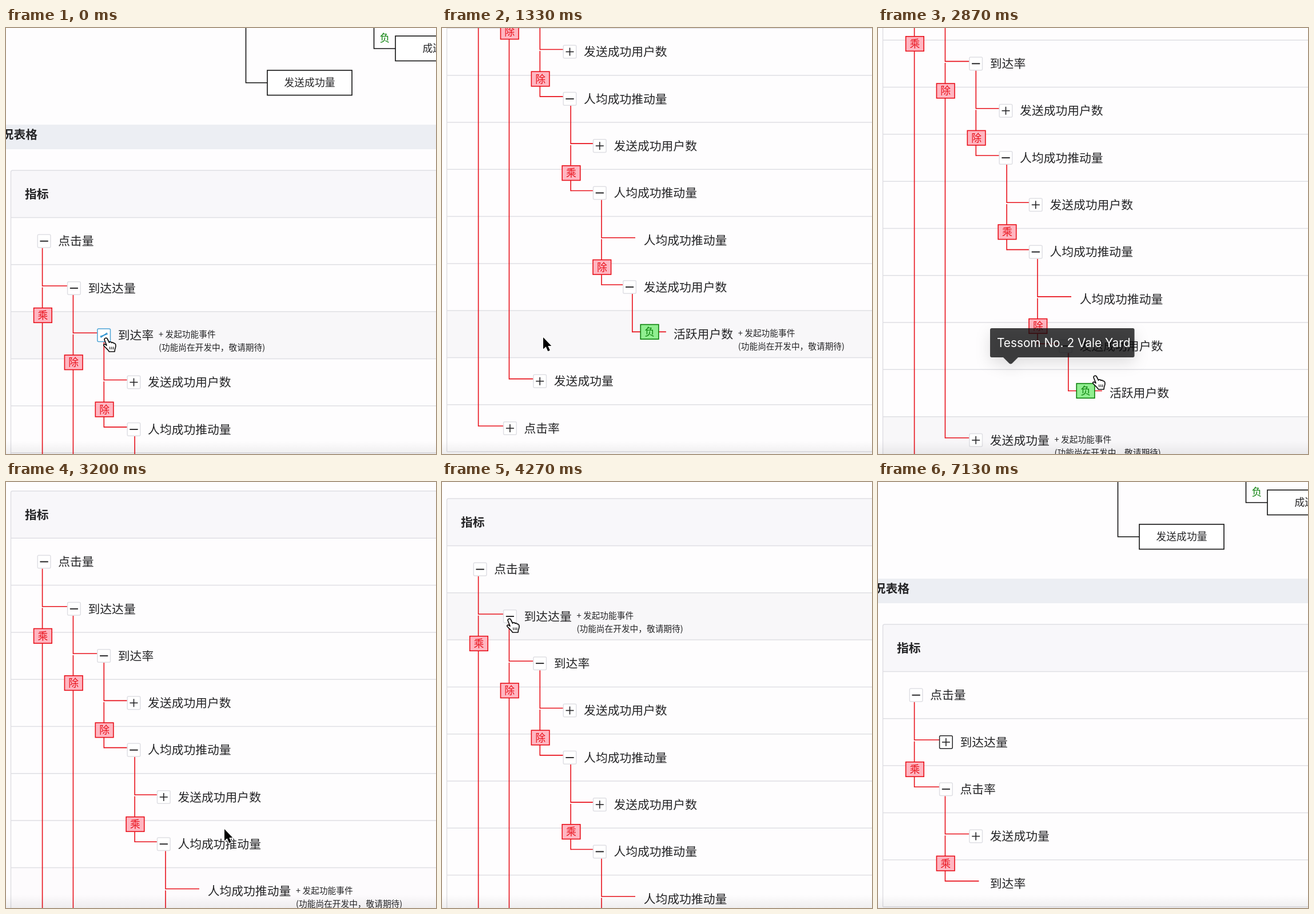
These frames come from a looping animation (752 px wide and 745 px high, 7.19 s). An HTML page:

```html
<!DOCTYPE html>
<html lang="zh-CN">
<head>
<meta charset="utf-8">
<style>
html, body { margin: 0; width: 100%; height: 100%; overflow: hidden; background: #fefdfe; }
svg { display: block; width: 100vw; height: 100vh; }
text { font-family: "Noto Sans CJK SC", "Noto Sans CJK", sans-serif; fill: #242426; white-space: pre; }
.tip { font-family: Inter, Roboto, sans-serif; fill: #fff; }
</style>
</head>
<body>
<svg viewBox="0 0 752 745">
  <defs>
    <linearGradient id="fade" x2="0" y2="1">
      <stop offset="0" stop-opacity="0"/><stop offset="1" stop-opacity=".06"/>
    </linearGradient>
    <filter id="shadow" x="-30%" y="-80%" width="160%" height="300%" color-interpolation-filters="sRGB">
      <feDropShadow dx="0" dy="9" stdDeviation="13" flood-opacity=".16"/>
    </filter>
  </defs>
  <g id="page"></g>
  <rect y="722" width="752" height="23" fill="url(#fade)"/>
  <g id="overlay"></g>
</svg>
<script>
const LOOP = 7190, STEP = 1000 / 15, ROW = 82.3, TOP = 331.5, SIZE = 20.8;
const RED = '#e8101a', GREEN = '#0a800a', LINE = '#dfdfe4', INK = '#242426';
const EXPAND_REACH = 1850, COLLAPSE = 4480;
const page = document.getElementById('page');
const overlay = document.getElementById('overlay');

const node = (id, name, op, kids = []) => ({ id, name, op, kids });
const tree = node(0, '点击量', '乘', [
  node(1, '到达达量', '除', [
    node(2, '到达率', '除', [
      node(3, '发送成功用户数', '+'),
      node(4, '人均成功推动量', '乘', [
        node(5, '发送成功用户数', '+'),
        node(6, '人均成功推动量', '除', [
          node(7, '人均成功推动量'),
          node(8, '发送成功用户数', '负', [node(9, '活跃用户数')])
        ])
      ])
    ]),
    node(10, '发送成功量', '+')
  ]),
  node(11, '点击率', '乘', [node(12, '发送成功量', '+'), node(13, '到达率')])
]);

// [time, row id]
const hovers = [[-500, 2], [560, 7], [680, 8], [900, 9], [1610, 10], [1690, 11], [2050, 10],
  [3010, 8], [3130, 7], [3260, 6], [3800, 5], [3860, 4], [3910, 3], [3960, 2], [4030, 1], [COLLAPSE, -1]];
// [time, x, y]
const pointer = [[0, 177, 541], [1450, 177, 541], [1780, 121, 703], [1900, 121, 703], [2250, 240, 612],
  [2550, 382, 607], [3650, 382, 607], [4150, 120, 238], [4550, 120, 238], [5000, 150, -40], [LOOP, 150, -40]];
const handTimes = [[0, 560], [1750, 1950], [2450, 3000], [4100, COLLAPSE]];
const tips = [
  { from: 2330, to: 3000, x: 196, y: 525, text: 'Tessom No. 2 Vale Yard' },
  { from: 3290, to: 3780, x: 300.5, y: 562, text: 'Tessom No. 4 Vale Yard' }
];

const clamp = v => Math.max(0, Math.min(1, v));
const easeOut = p => 1 - (1 - clamp(p)) ** 3;
const smooth = p => p * p * (3 - 2 * p);
const rect = (x, y, w, h, fill, more = '') => `<rect x="${x}" y="${y}" width="${w}" height="${h}" fill="${fill}" ${more}/>`;
const path = (d, color = RED, width = 1.6) => `<path d="${d}" fill="none" stroke="${color}" stroke-width="${width}"/>`;
const text = (x, y, s, size = SIZE, more = '') => `<text x="${x}" y="${y}" font-size="${size}" ${more}>${s}</text>`;
const branchY = rowY => rowY - 4;

function scrollAt(t) {
  if (t >= COLLAPSE) return 0;
  if (t >= 2798) return 587 - 367 * easeOut((t - 2798) / 600);
  return 578 * easeOut((t - 250) / 886) + 9 * easeOut((t - 2000) / 300);
}

// 1 = open (minus), 0 = closed (plus)
function openness(id, t) {
  if (id === 2) return easeOut((t + 125) / 300);
  if (id === 11) return easeOut((t - EXPAND_REACH) / 300);
  if (id === 1) return 1 - easeOut((t - COLLAPSE) / 300);
  return 1;
}

function isOpen(n, t) {
  if (n.id === 1) return t < COLLAPSE;
  if (n.id === 11) return t >= EXPAND_REACH;
  return n.kids.length > 0;
}

function iconColors(id, t) {
  const focus = t < EXPAND_REACH ? 2 : t < COLLAPSE ? 11 : 1;
  if (id !== focus) return [LINE, INK];
  return id === 1 ? [INK, INK] : ['#4ba3d6', '#2f93d0'];
}

function icon(n, x, y, t) {
  const [border, bar] = iconColors(n.id, t);
  const q = n.op === '+' ? 0 : openness(n.id, t);
  const stroke = angle => `<path d="M-7 0H7" stroke="${bar}" stroke-width="1.6" transform="translate(${x} ${y}) rotate(${angle})"/>`;
  return rect(x - 11.3, y - 11.3, 22.6, 22.6, '#fff', `rx="2" stroke="${border}" stroke-width="1.5"`) +
    stroke(-180 * (1 - q)) + stroke(90 + 90 * q);
}

function tag(x, y, op) {
  const plus = op === '负';
  const color = plus ? GREEN : RED;
  return rect(x - 15.8, y - 12.8, 31.6, 25.6, plus ? '#90ee90' : '#ffb6c1', `stroke="${color}" stroke-width="1.6"`) +
    text(x, y + 6.6, op, 17.8, `text-anchor="middle" style="fill:${color}"`);
}

function visibleRows(n, t, depth = 0, rows = []) {
  const item = { n, depth, y: TOP + ROW * (rows.length + 0.5) };
  rows.push(item);
  item.kids = isOpen(n, t) ? n.kids.map(kid => {
    const index = rows.length;
    visibleRows(kid, t, depth + 1, rows);
    return rows[index];
  }) : [];
  return rows;
}

function branches({ n, depth, y, kids }) {
  if (!kids.length) return '';
  const x = 63.6 + 53.85 * depth;
  const first = branchY(kids[0].y), last = branchY(kids[kids.length - 1].y);
  let s = path(`M${x} ${y + 12}V${first + 0.8}`);
  if (kids.length > 1) s += path(`M${x} ${first + 2.6}V${last + 0.8}`);
  for (const kid of kids) {
    const end = kid.n.op ? 55.3 + 52.3 * kid.depth : x + 59;
    s += path(`M${x} ${branchY(kid.y)}H${end}`);
  }
  return s + (n.op === '负' ? tag(x + 30.2, first, n.op) : tag(x + 0.8, first + 51.5, n.op));
}

function hoverShade(id, t) {
  let shade = 0;
  hovers.forEach(([from, row], i) => {
    if (row !== id) return;
    const to = hovers[i + 1] ? hovers[i + 1][0] : LOOP;
    if (t >= from) shade = Math.max(shade, Math.min(clamp((t - from) / 200), clamp(1 - (t - to - 40) / 200)));
  });
  return t >= COLLAPSE ? 0 : shade;
}

function label({ n, depth, y }, t, hovered) {
  const x = 91.2 + 52.3 * depth;
  let s = text(x, y + 7.8, n.name);
  if (n.op) s += icon(n, 66.6 + 52.3 * depth, y, t);
  if (n.id === hovered) {
    const noteX = x + SIZE * n.name.length + 8.8;
    s += text(noteX, y + 4, '+ 发起功能事件', 14.7) + text(noteX, y + 27, '(功能尚在开发中，敬请期待)', 14.7);
  }
  return s;
}

function chartEnd() {
  const box = (x, y) => rect(x, y, 148, 43.5, '#fff', 'stroke="#111" stroke-width="1.6"');
  return path('M419.5 0V95.7H457M643.5 0V36H681', '#111') + box(457, 74) + box(681, 14) +
    text(531, 102, '发送成功量', 17.8, 'text-anchor="middle"') +
    text(728.5, 42.4, '成送率', 17.8) +
    text(653.5, 24, '负', 17.8, `style="fill:${GREEN}"`) +
    rect(0, 169, 752, 43, '#eceef3') +
    text(-7.4, 193.5, '况表格', SIZE, 'font-weight="700"');
}

function table(t) {
  const rows = visibleRows(tree, t);
  const bottom = TOP + ROW * rows.length;
  const current = hovers.filter(h => h[0] <= t).pop()[1];
  let s = `<path d="M752 249H11.5Q8.5 249 8.5 252V331H752Z" fill="#f8f7fa"/>`;
  s += text(33, 298, '指标', SIZE, 'font-weight="700"');
  for (const { n, y } of rows) {
    const shade = hoverShade(n.id, t);
    if (shade) s += rect(8.5, y - ROW / 2, 744, ROW, '#f8f7f9', `opacity="${shade}"`);
  }
  let grid = `M760 249H11.5Q8.5 249 8.5 252V${bottom}`;
  for (let i = 0; i <= rows.length; i++) grid += `M8.5 ${TOP + ROW * i}H760`;
  s += path(grid, LINE, 1.5);
  return s + rows.map(branches).join('') + rows.map(r => label(r, t, current)).join('');
}

function tooltip({ from, to, x, y, text: words }, t) {
  const alpha = Math.min(clamp((t - from) / 130), clamp(1 - (t - to) / 130));
  if (!alpha) return '';
  return `<g opacity="${alpha}" transform="translate(${x} ${y})">
    <path d="M3 0H249.5Q252.5 0 252.5 3V48Q252.5 51 249.5 51H49L38.5 61.5Q36 63.5 33.5 61.5L23 51H3Q0 51 0 48V3Q0 0 3 0Z"
      fill="#0c0c0d" fill-opacity=".78" filter="url(#shadow)"/>
    ${text(12, 33, words, SIZE, 'class="tip"')}</g>`;
}

function cursor(t) {
  const i = pointer.findIndex((k, j) => j && t <= k[0]);
  const [t0, x0, y0] = pointer[i - 1], [t1, x1, y1] = pointer[i];
  const p = smooth((t - t0) / (t1 - t0));
  const hand = handTimes.some(([from, to]) => t >= from && t < to);
  const shape = hand
    ? `<path d="M-5 4C-5 1-1 0 .5 3L3.5 9C4 7.5 7 7.5 8 9.5C9 8.5 11 9 11.5 10.5C13 10 14.5 11 14.8 13C15.5 17 14 19 13.5 21L13 25H3.5C2 22-3 18-6 14.5C-7 12.5-4.5 11-2.5 13L-1 14Z"
        fill="#fff" stroke="#111" stroke-width="1.7" stroke-linejoin="round"/>
       <path d="M4.5 16.5L5 21M7.7 16.5L8 21M10.8 16.5V21" stroke="#111" stroke-width="1.2"/>`
    : `<path d="M0 0V20.5L4.7 16.3L8.2 24.3L11.8 22.7L8.3 15H14.3Z" fill="#000" stroke="#fff"
        stroke-width="2.6" stroke-linejoin="round" paint-order="stroke"/>`;
  return `<g transform="translate(${x0 + (x1 - x0) * p} ${y0 + (y1 - y0) * p})">${shape}</g>`;
}

function draw(t) {
  page.setAttribute('transform', `translate(0 ${-scrollAt(t)})`);
  page.innerHTML = chartEnd() + table(t);
  overlay.innerHTML = tips.map(tip => tooltip(tip, t)).join('') + cursor(t);
}

const start = performance.now();
function tick() {
  const t = (performance.now() - start) % LOOP;
  draw(Math.floor(t / STEP) * STEP);
  requestAnimationFrame(tick);
}
tick();
</script>
</body>
</html>
```
